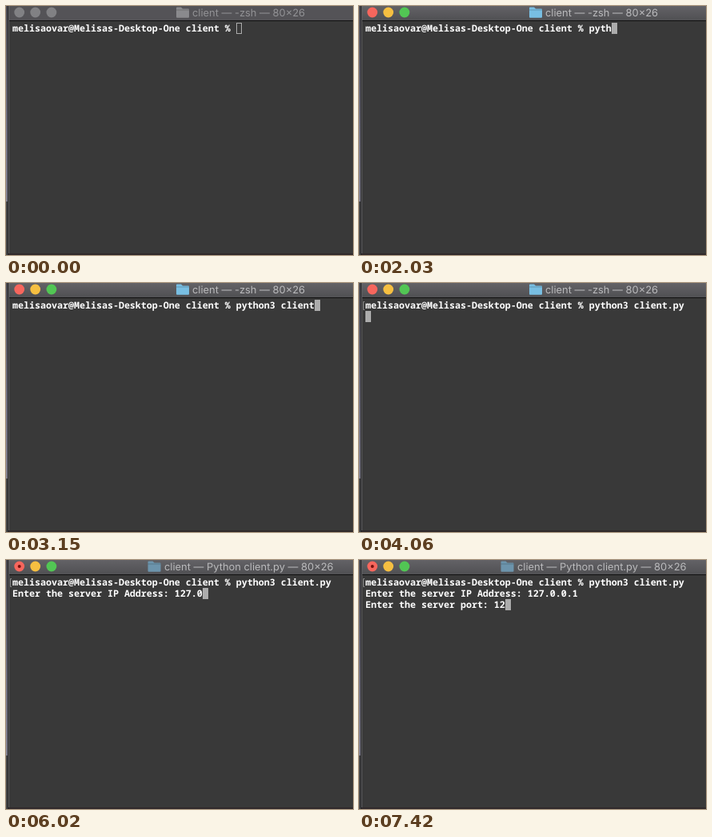
Write an HTML page that moves like this. It is 434 px wide and 312 px high and loops after 8 s.

```html
<!DOCTYPE html>
<html lang="en">
<head>
<meta charset="utf-8">
<title>Terminal session</title>
<style>
  html, body { margin: 0; width: 100%; height: 100%; overflow: hidden; background: #393939; }
  svg { display: block; width: 434px; height: 312px; }
  text { white-space: pre; text-rendering: geometricPrecision; }
  #title { font: 12.88px Inter, sans-serif; fill: #bababc; }
  .row { font: bold 11.667px "Noto Sans Mono", monospace; fill: #fff; }
  #folder { fill: #78bee2; }
  .busy #folder { fill: #6c94ac; }
  .idle #folder { fill: #8a8a8d; }
  .idle #title { fill: #929295; }
  .idle #lights circle { fill: #818184; }
  .idle #bar { fill: #545357; }
  #cursor { fill: #acacac; }
  .idle #cursor { fill: none; stroke: #acacac; }
  #dot, #mark { visibility: hidden; }
  .busy #dot, .entered #mark { visibility: visible; }
</style>
</head>
<body>
<svg id="stage" viewBox="0 0 434 312">
  <defs>
    <linearGradient id="barFill" x2="0" y2="1">
      <stop stop-color="#636266"/><stop offset="1" stop-color="#505053"/>
    </linearGradient>
    <linearGradient id="edgeFill" x2="0" y2="1">
      <stop stop-color="#4c4b52"/><stop offset=".6" stop-color="#727181"/><stop offset="1" stop-color="#838292"/>
    </linearGradient>
  </defs>
  <rect width="434" height="312" fill="#393939"/>
  <rect id="bar" x="3" width="431" height="18" fill="url(#barFill)"/>
  <rect x="3" y="18" width="431" height="1" fill="#101010"/>
  <rect width="3" height="312" fill="#222224"/>
  <rect width="2" height="312" fill="#454547"/>
  <rect width="2" height="245" fill="url(#edgeFill)"/>
  <rect x="3" width="1" height="310" fill="#606062"/>
  <rect x="3" y="310" width="431" height="2" fill="#30292b"/>
  <g id="lights">
    <circle cx="16.7" cy="8" r="6.4" fill="#f7665d"/>
    <circle cx="36.7" cy="8" r="6.4" fill="#f6bf41"/>
    <circle cx="56.9" cy="8" r="6.4" fill="#52c654"/>
  </g>
  <circle id="dot" cx="16.7" cy="8" r="2" fill="#75110d"/>
  <g id="folder">
    <path d="M0 2.5q0-1 1-1h5l2 2h7q1 0 1 1v9.2q0 1-1 1H1q-1 0-1-1z"/>
    <path d="M0 5h16" stroke="#0003"/>
  </g>
  <text id="title" y="13"></text>
  <path id="mark" d="M7 23.5H5.5v10H7" fill="none" stroke="#8c8c8c"/>
  <text class="row" x="8" y="32"></text>
  <text class="row" x="8" y="46"></text>
  <text class="row" x="8" y="60"></text>
  <rect id="cursor"/>
</svg>
<script>
const LOOP = 8000, CELL = 7, LINE = 14;
const FOCUS = 70, ENTER = 4060, LAUNCH = 4130;

// Each row: when its prompt appears, the prompt, the typed text and its key times.
const rows = [
  { at: 0, prompt: "melisaovar@Melisas-Desktop-One client % ", typed: "python3 client.py",
    keys: [1610, 1750, 1890, 2030, 2170, 2310, 2380, 2520,
           2730, 2800, 2870, 2940, 3080, 3150, 3360, 3500, 3710] },
  { at: 4200, prompt: "Enter the server IP Address: ", typed: "127.0.0.1",
    keys: [5110, 5110, 5530, 5810, 6020, 6230, 6440, 6720, 6860] },
  { at: 7000, prompt: "Enter the server port: ", typed: "12", keys: [7280, 7420] }
];

const byId = id => document.getElementById(id);
const stage = byId("stage"), title = byId("title"), folder = byId("folder"), cursor = byId("cursor");
const lines = document.querySelectorAll(".row");

function setAttrs(el, attrs) {
  for (const name in attrs) el.setAttribute(name, attrs[name]);
}

function draw(t) {
  const idle = t < FOCUS, entered = t >= ENTER, busy = t >= LAUNCH;
  stage.classList.toggle("idle", idle);
  stage.classList.toggle("entered", entered);
  stage.classList.toggle("busy", busy);

  title.textContent = `client — ${busy ? "Python client.py" : "-zsh"} — 80×26`;
  title.setAttribute("x", busy ? 198 : 233);
  folder.setAttribute("transform", `translate(${busy ? 177.5 : 213} 0)`);

  let row = entered ? 1 : 0, col = 0;
  rows.forEach(({ at, prompt, typed, keys }, i) => {
    const text = t < at ? "" : prompt + typed.slice(0, keys.filter(k => k <= t).length);
    lines[i].textContent = text;
    if (t >= at && i >= row) { row = i; col = text.length; }
  });

  const inset = idle ? 0.5 : 0;
  setAttrs(cursor, {
    x: 8 + col * CELL + inset, y: 21 + row * LINE + inset,
    width: CELL - 2 * inset, height: LINE - 2 * inset
  });
}

const start = performance.now();
function tick() {
  draw((performance.now() - start) % LOOP);
  requestAnimationFrame(tick);
}
tick();
</script>
</body>
</html>
```
